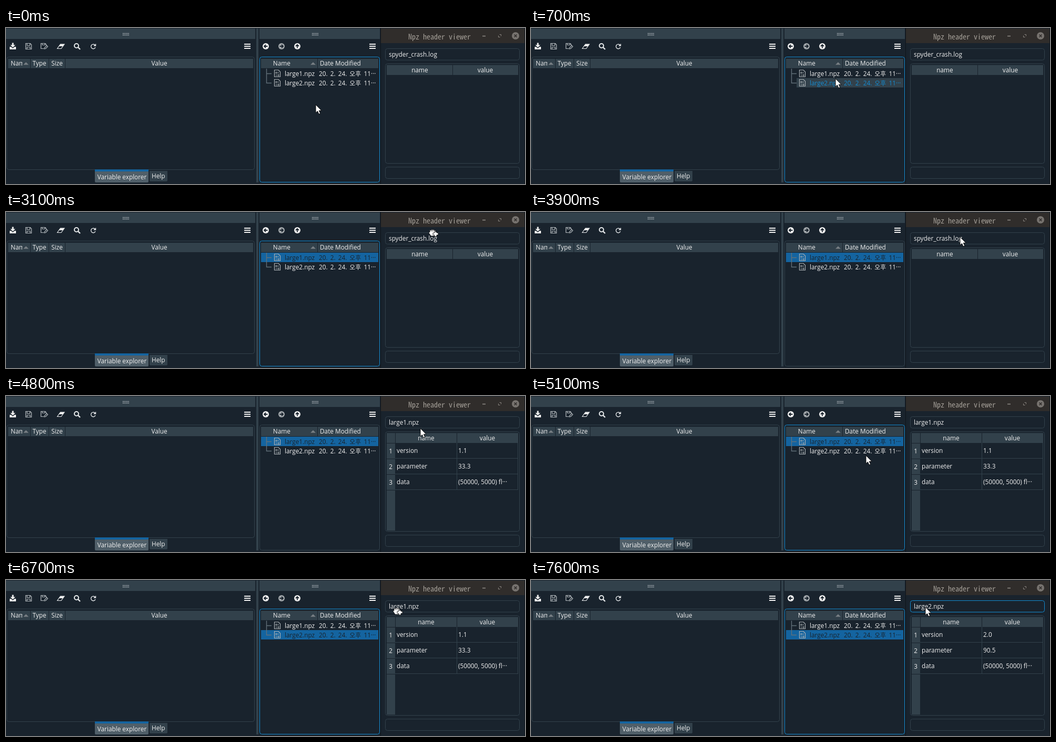
An HTML page for the animation above (8 s loop, 987 by 299 pixels).

```html
<!DOCTYPE html>
<html lang="en">
<head>
<meta charset="utf-8">
<title>Npz header viewer</title>
<style>
html, body { margin: 0; width: 100%; height: 100%; overflow: hidden; background: #19232d; }
svg { display: block; width: 987px; height: 299px; }
text { font: 11.8px "Open Sans", "Noto Sans", "Noto Sans CJK KR", "Noto Sans CJK", sans-serif; fill: #f0f0f0; }
.mid { text-anchor: middle; }
.title { font: 14px "Noto Sans Mono CJK KR", "Noto Sans Mono CJK JP", "Noto Sans Mono", monospace; fill: #a5a099; }
.date { word-spacing: 2px; }
.bar { fill: #32414b; }
.gap { stroke: #19232d; }
.box { fill: none; stroke: #32414b; }
.grid { fill: none; stroke: #32414b; }
.line { fill: none; stroke: #e6e9eb; stroke-width: 1.2; }
.solid { fill: #f0f0f0; }
.sel { fill: #1464a0; }
.hov { fill: #32414b; }

/* one clock: 100 ms = 1.25 % */
.t { animation: 8s step-end infinite; }
.pointer { animation-name: move; }
.arrow { animation-name: arrow; }
.hand { animation-name: hand; }
.plus { animation-name: plus; }
.panel { animation-name: panel; }
.path { animation-name: path; }
.hov1 { animation-name: hov1; }
.hov2 { animation-name: hov2; }
.sel1 { animation-name: sel1; }
.sel2 { animation-name: sel2; }
.ink1 text { animation: ink1 8s step-end infinite; }
.ink2 text { animation: ink2 8s step-end infinite; }
.empty { animation-name: empty; }
.filled { animation-name: filled; }
.first { animation-name: first; }
.second { animation-name: second; }

@keyframes move {
  0% { transform: translate(589px, 147px); }
  5% { transform: translate(588px, 142px); }
  6.25% { transform: translate(586px, 129px); }
  7.5% { transform: translate(582px, 112px); }
  8.75% { transform: translate(579px, 97px); }
  10% { transform: translate(578px, 92px); }
  20% { transform: translate(612px, 83px); }
  21.25% { transform: translate(704px, 61px); }
  22.5% { transform: translate(785px, 45px); }
  23.75% { transform: translate(811px, 41px); }
  38.75% { transform: translate(812px, 40px); }
  40% { transform: translate(814px, 42px); }
  41.25% { transform: translate(817px, 45px); }
  42.5% { transform: translate(818px, 48px); }
  43.75% { transform: translate(818px, 49px); }
  48.75% { transform: translate(816px, 48px); }
  60% { transform: translate(788px, 62px); }
  61.25% { transform: translate(720px, 88px); }
  62.5% { transform: translate(657px, 110px); }
  63.75% { transform: translate(637px, 114px); }
  66.25% { transform: translate(635px, 112px); }
  67.5% { transform: translate(631px, 109px); }
  68.75% { transform: translate(629px, 108px); }
  80% { transform: translate(642px, 102px); }
  81.25% { transform: translate(676px, 87px); }
  82.5% { transform: translate(716px, 70px); }
  83.75% { transform: translate(744px, 60px); }
  85%, 100% { transform: translate(753px, 57px); }
  93.75% { transform: translate(750px, 52px); }
}
@keyframes arrow { 0%, 41.25%, 93.75% { opacity: 1; } 20%, 80% { opacity: 0; } }
@keyframes hand { 0%, 41.25%, 93.75% { opacity: 0; } 20%, 80% { opacity: 1; } }
@keyframes plus { 0%, 41.25%, 80% { opacity: 0; } 22.5%, 82.5% { opacity: 1; } }
@keyframes panel { 0%, 62.5% { stroke: #148cd2; } 41.25% { stroke: #32414b; } }
@keyframes path { 0%, 60% { stroke: #32414b; } 51.25%, 93.75% { stroke: #148cd2; } }
@keyframes hov1 { 0%, 15% { opacity: 0; } 10% { opacity: 1; } }
@keyframes hov2 { 0%, 10%, 72.5% { opacity: 0; } 7.5%, 66.25% { opacity: 1; } }
@keyframes sel1 { 0%, 72.5% { opacity: 0; } 15% { opacity: 1; } }
@keyframes sel2 { 0% { opacity: 0; } 72.5%, 100% { opacity: 1; } }
@keyframes ink1 { 0%, 72.5% { fill: #f0f0f0; } 10% { fill: #148cd2; } 15% { fill: #19232d; } }
@keyframes ink2 { 0%, 10% { fill: #f0f0f0; } 7.5%, 66.25% { fill: #148cd2; } 72.5%, 100% { fill: #19232d; } }
@keyframes empty { 0% { opacity: 1; } 51.25%, 100% { opacity: 0; } }
@keyframes filled { 0% { opacity: 0; } 51.25%, 100% { opacity: 1; } }
@keyframes first { 0%, 95% { opacity: 0; } 51.25% { opacity: 1; } }
@keyframes second { 0% { opacity: 0; } 95%, 100% { opacity: 1; } }
</style>
</head>
<body>
<svg viewBox="0 0 987 299">
  <defs>
    <path id="grip" d="M0 0h12M0 3h12" stroke="#c3c9cd" stroke-width="1.4" stroke-dasharray="1.4 1.2"/>
    <path id="menu" d="M0 0h12M0 4h12M0 8h12" stroke="#f0f0f0" stroke-width="1.8"/>
    <path id="sort" d="M0 5L5 0L10 5Z" fill="#787f84"/>
    <g id="nav">
      <circle r="6"/>
      <path d="M3.5 0H-3M0-3L-3 0L0 3" fill="none" stroke="#19232d" stroke-width="1.8"/>
    </g>
    <g id="file" fill="none" stroke="#a9afb3">
      <path d="M.5 .5H8L11.5 4V13.5H.5Z" stroke-width="1.2"/>
      <path d="M3 4.5h2v2.5h-2zM7.5 4v3.5M4 9v3.5M7 9.5h2v2.5h-2z" stroke-width=".9"/>
    </g>
    <clipPath id="nameCell"><path d="M4 59H31V78H4Z"/></clipPath>
  </defs>
  <rect width="987" height="299" fill="#19232d"/>

  <!-- variable explorer -->
  <path class="bar" d="M0 1H474V21H0ZM476 1H480V296H476Z"/>
  <use href="#grip" x="222" y="10.5"/>
  <g class="solid">
    <path d="M11.5 28.5h3v4h3.3L13 37.3L8.2 32.500h3.300z"/>
    <path d="M7 36h2.700l3.300 3l3.300-3H19v5H7Z"/>
  </g>
  <g class="line" style="stroke:#b3b9bd">
    <path d="M37.500 29.500h8.500l2.500 2.500v8.500h-11zM40 29.500v4h5.500v-4M40 40.500v-4h6v4"/>
    <path d="M72 39.500h-5.500v-10h8l2 2v2M69 29.500v3h5v-3M73 40l.5-2.500l4-4l2 2l-4 4z"/>
  </g>
  <path class="line" d="M97.500 39.500L103.500 31H111L105 39.500Z"/>
  <path class="solid" d="M100.500 35L103.500 31H111L108 35Z"/>
  <circle cx="134" cy="34" r="4" class="line" style="stroke-width:2"/>
  <path d="M137 37l4 4" class="line" style="stroke-width:2.400"/>
  <path d="M169.500 33A4.300 4.300 0 1 0 170 37M170.500 30.500v3.500h-3.500" class="line" style="stroke-width:1.400"/>
  <use href="#menu" x="453" y="31"/>

  <rect class="box" x="1.500" y="55.500" width="471" height="216" rx="4"/>
  <path class="bar" d="M4 59H470V77H4Z"/>
  <path class="gap" d="M46.500 59V77M81.500 59V77M112.500 59V77"/>
  <text x="9" y="72" clip-path="url(#nameCell)">Name</text>
  <use href="#sort" x="33" y="65.500"/>
  <text class="mid" x="63.500" y="72">Type</text>
  <text class="mid" x="97" y="72">Size</text>
  <text class="mid" x="291.500" y="72">Value</text>

  <path d="M169 271H271V294a2 2 0 0 1-2 2H171a2 2 0 0 1-2-2Z" fill="#505f69"/>
  <path class="sel" d="M169 271H271V275H169Z"/>
  <text class="mid" x="220.500" y="290">Variable explorer</text>
  <path class="bar" d="M273 274H307V292a2 2 0 0 1-2 2H275a2 2 0 0 1-2-2Z"/>
  <text class="mid" x="289.800" y="288">Help</text>

  <!-- file list -->
  <path class="bar" d="M482 1H711V21H482Z"/>
  <use href="#grip" x="582" y="10.500"/>
  <g fill="#f0f0f0">
    <use href="#nav" transform="translate(494 35)"/>
    <use href="#nav" transform="translate(524 35) scale(-1 1)" fill="#a0a5a9"/>
    <use href="#nav" transform="translate(554 35) rotate(90)"/>
  </g>
  <use href="#menu" x="691" y="31"/>

  <rect class="box t panel" x="482.500" y="55.500" width="228" height="240" rx="4"/>
  <path class="bar" d="M485 59H708V77H485Z"/>
  <path class="gap" d="M592.500 59V77"/>
  <text class="mid" x="524.300" y="72">Name</text>
  <use href="#sort" x="579" y="65.500"/>
  <text x="597" y="72">Date Modified</text>

  <rect class="hov t hov1" x="505" y="78" width="203" height="18"/>
  <rect class="hov t hov2" x="505" y="96" width="203" height="18"/>
  <rect class="sel t sel1" x="485" y="78" width="223" height="18"/>
  <rect class="sel t sel2" x="485" y="96" width="223" height="18"/>
  <path d="M495.500 78V105.500H505M495.500 87.500H505" fill="none" stroke="#62707a" stroke-width="1.400"/>
  <use href="#file" x="510" y="80"/>
  <use href="#file" x="510" y="98"/>
  <g class="ink1">
    <text x="530" y="92">large1.npz</text>
    <text class="date" x="595" y="92">20. 2. 24. 오후</text>
    <text x="680.500" y="92">11···</text>
  </g>
  <g class="ink2">
    <text x="530" y="110">large2.npz</text>
    <text class="date" x="595" y="110">20. 2. 24. 오후</text>
    <text x="680.500" y="110">11···</text>
  </g>

  <!-- viewer window -->
  <path d="M712.500 0V299M986.500 0V299" stroke="#0e1319"/>
  <path d="M713 1H986V29H713Z" fill="#302d2b"/>
  <text class="title" x="765" y="21.500">Npz header viewer</text>
  <g fill="none" stroke="#8b8782">
    <path d="M906 15.500h6" stroke-width="1.600"/>
    <path d="M938.500 12.500h3v3M936.500 14.500v3h3"/>
  </g>
  <circle cx="969" cy="15" r="7" fill="#77736f"/>
  <path d="M966.500 12.500l5 5m0-5l-5 5" stroke="#302d2b" stroke-width="1.600"/>

  <rect class="box t path" x="721.500" y="39.500" width="255" height="22" rx="4"/>
  <text class="t empty" x="728" y="55">spyder_crash.log</text>
  <text class="t first" x="728" y="55">large1.npz</text>
  <text class="t second" x="728" y="55">large2.npz</text>
  <rect class="box" x="721.500" y="68.500" width="255" height="191" rx="4"/>
  <rect class="box" x="721.500" y="266.500" width="255" height="22" rx="4"/>
  <path class="bar" d="M724 71H974V90H724Z"/>

  <g class="t empty">
    <path class="gap" d="M849.500 71V90"/>
    <text class="mid" x="787" y="85">name</text>
    <text class="mid" x="911.500" y="85">value</text>
  </g>
  <g class="t filled">
    <path class="bar" d="M724 90H740V258H724Z"/>
    <path class="gap" d="M740.500 71V90M857.500 71V90M724 90.500H740M724 120.500H740M724 150.500H740M724 180.500H740"/>
    <path class="grid" d="M740 119.500H974M740 149.500H974M740 179.500H974M857.500 90V180M973.500 90V180"/>
    <text class="mid" x="799" y="85">name</text>
    <text class="mid" x="915.500" y="85">value</text>
    <text class="mid" x="731.500" y="110">1</text>
    <text class="mid" x="731.500" y="140">2</text>
    <text class="mid" x="731.500" y="170">3</text>
    <text x="743" y="109">version</text>
    <text x="743" y="139">parameter</text>
    <text x="743" y="169">data</text>
    <text x="860" y="169">(50000, 5000) fl···</text>
  </g>
  <g class="t first">
    <text x="860" y="109">1.1</text>
    <text x="860" y="139">33.3</text>
  </g>
  <g class="t second">
    <text x="860" y="109">2.0</text>
    <text x="860" y="139">90.5</text>
  </g>

  <g class="t pointer">
    <path class="t arrow" d="M0 0V15.500L3.500 12.300L6 18L8.700 16.800L6.300 11.300H11Z" fill="#fff" stroke="#000" stroke-width=".9"/>
    <g class="t hand" stroke="#000" stroke-width=".8">
      <path d="M-8 0Q-8-2-6-1.500V-4.500Q-5-6.500-3.300-5Q-2-7.500-.300-5.700Q1.500-7 2.500-5Q5-5.500 5-3V1.500Q4.500 4 3.500 6H-4Q-5 4-8 0Z" fill="#fff"/>
      <path d="M-3.200-5v2.500M-.300-5.500v3M2.500-5v2.500" fill="none"/>
      <path class="t plus" d="M3-2H7V0H10V4H7V7H3V4H0V0H3Z" fill="#fff"/>
    </g>
  </g>
</svg>
</body>
</html>
```
